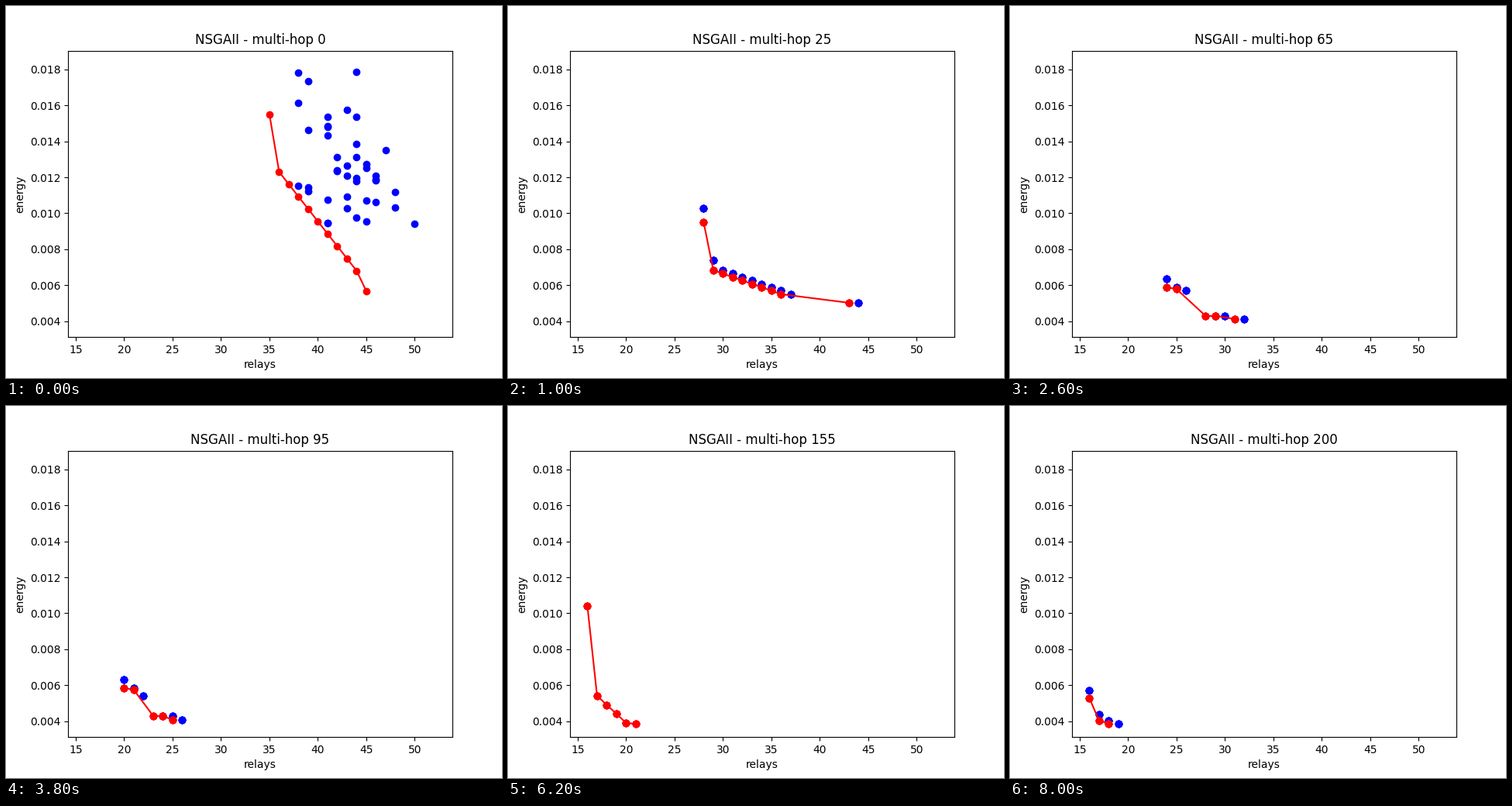
Write a matplotlib script that moves like this. It is 640 px wide and 480 px high and loops after 8.2 s.

```python
import numpy as np
import matplotlib.pyplot as plt
from matplotlib.animation import FuncAnimation

STEP, LAST = 5, 200   # generations per picture, final generation
UNIT = 1e-4           # energies below are in this unit
COPIES = 5            # evolved solutions coincide
SETTLE = 25           # generation by which the random start has settled

# Each front has a short head, a body and an end point:
# generation, head size, head, body start, body end, end point
KEYS = [
    (0, 1, (35, 155), (36, 123), (44, 68), (45, 56.7)),
    (25, 1, (28, 95), (29, 68.3), (36, 55), (43, 50.2)),
    (65, 2, (24, 58.8), (28, 42.9), (29, 42.9), (31, 41.2)),
    (95, 2, (20, 58.4), (23, 42.9), (24, 42.9), (25, 40.7)),
    (115, 2, (19, 56.3), (21, 40.7), (21, 40.7), (22, 40.6)),
    (155, 1, (16, 104), (17, 54.1), (20, 39), (21, 38.5)),
    (200, 1, (16, 52.8), (17, 40.3), (17, 40.3), (18, 38.6)),
]
GENS = [key[0] for key in KEYS]
SHAPES = np.array([np.hstack(key[1:]) for key in KEYS])

rng = np.random.default_rng(4)
CLOUD_X = np.clip(np.round(rng.normal(43.3, 2.8, 41)), 38, 51)
CLOUD_Y = np.clip(rng.normal(127, 25, 41), 79, 183)


def front_at(gen):
    size, *knots = [np.interp(gen, GENS, col) for col in SHAPES.T]
    (hx, b0, b1, ex), (hy, y0, y1, ey) = np.round(knots[::2]), knots[1::2]
    head = [(hx + i, hy - i) for i in range(round(size))]
    body = [(x, np.interp(x, (b0, b1), (y0, y1)))
            for x in np.arange(b0, b1 + 1)]
    best = {}
    for x, y in head + body + [(ex, ey)]:
        best[x] = min(y, best.get(x, y))
    xs = np.array(sorted(best))
    return xs, np.minimum.accumulate([best[x] for x in xs])


def cloud_at(gen, xs, ys):
    """Random first population, sinking towards the front."""
    fade = max(0, 1 - gen / SETTLE) ** 2
    n = round(len(CLOUD_X) * fade)
    x = CLOUD_X[:n] + xs[0] - KEYS[0][2][0]
    first = np.interp(CLOUD_X[:n], *front_at(0))
    excess = np.maximum(CLOUD_Y[:n] - first, 6)
    return x, np.interp(x, xs, ys) + excess * fade


def followers(xs, ys):
    """Dominated solutions: one relay more for the same energy."""
    if ys[0] > 1.7 * ys[1]:    # a steep front crowds them out
        return [], []
    x = np.append(xs[0], xs + 1)
    cap = 1.08 * np.interp(x, xs, ys)
    return x, np.minimum(np.append(cap[0], ys), cap)


fig, ax = plt.subplots(figsize=(6.4, 4.8), dpi=100)
ax.set_xlim(14.205, 53.885)
ax.set_ylim(0.003113, 0.019047)
ax.set_xlabel("relays")
ax.set_ylabel("energy")
title = ax.set_title("")
blue, = ax.plot([], [], "bo")
red, = ax.plot([], [], "ro-")


def place(line, x, y, copies):
    line.set_data(np.repeat(x, copies), np.repeat(y, copies) * UNIT)


def update(i):
    gen = i * STEP
    copies = COPIES if gen else 1
    xs, ys = front_at(gen)
    x, y = cloud_at(gen, xs, ys)
    if gen:
        fx, fy = followers(xs, ys)
        x, y = np.append(x, fx), np.append(y, fy)
    place(blue, x, y, copies)
    place(red, xs, ys, copies)
    title.set_text(f"NSGAII - multi-hop {gen}")
    return blue, red, title


anim = FuncAnimation(fig, update, frames=LAST // STEP + 1, interval=200,
                     repeat=True, repeat_delay=0)
plt.show()
```
